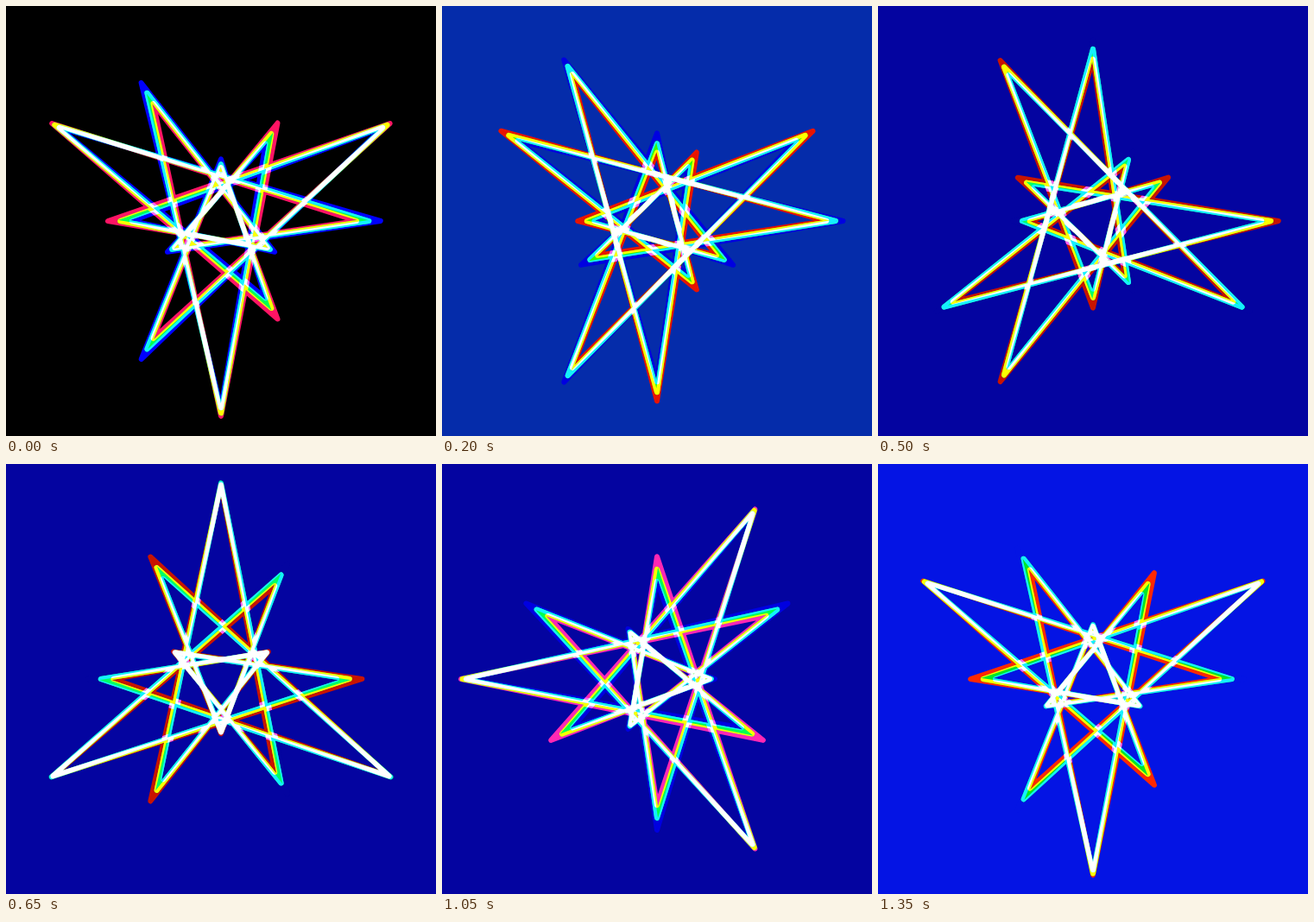
An HTML page with a canvas for the animation above (1.4 s loop, 498 by 498 pixels).

```html
<!DOCTYPE html>
<html lang="en">
<head>
<meta charset="utf-8">
<title>Pulsing star</title>
<style>
html, body { margin: 0; width: 100%; height: 100%; overflow: hidden; background: #000; }
canvas { display: block; width: 498px; height: 498px; }
</style>
</head>
<body>
<canvas id="stage" width="498" height="498"></canvas>
<script>
const SIZE = 498, MID = SIZE / 2, STEP_MS = 50, STEPS = 28;
const MEAN = 144, SWING = 83, LINE = 6;
const RAD = Math.PI / 180;

const ctx = document.getElementById('stage').getContext('2d');
const layer = document.createElement('canvas');
layer.width = layer.height = SIZE;
const mix = layer.getContext('2d');

// first step, background, red, green, blue
const moods = [
  [0, '#000000', '#ff1464', '#00ff50', '#0000ff'],
  [1, '#052caa', '#e81400', '#30ff00', '#0000e0'],
  [7, '#700c5a', '#f01e78', '#00ff14', '#0028e6'],
  [10, '#0404a0', '#c81400', '#00ff64', '#0404a0'],
  [15, '#0404a0', '#d21400', '#30ff00', '#0000e0'],
  [19, '#0404a0', '#ff28b4', '#00ff50', '#0000e0'],
  [24, '#0414e4', '#ff2800', '#00e628', '#0414e4']
];

// colours where the stars overlap
const overlaps = [
  [[0, 2], '#ff64ff'],
  [[0, 1], '#ffff00'],
  [[1, 2], '#14f0ff'],
  [[0, 1, 2], '#ffffff']
];

// Twelve corners joined five apart; radii swing a quarter turn out of step.
function starPath(phase) {
  const path = new Path2D();
  for (let i = 0; i < 12; i++) {
    const k = i * 5 % 12;
    const r = MEAN + SWING * Math.sin((phase - 90 * k) * RAD);
    path.lineTo(MID + r * Math.cos(30 * k * RAD), MID + r * Math.sin(30 * k * RAD));
  }
  path.closePath();
  return path;
}

function stroke(c, path, color, mode = 'source-over') {
  c.globalCompositeOperation = mode;
  c.lineWidth = LINE;
  c.lineJoin = 'round';
  c.strokeStyle = color;
  c.stroke(path);
}

// The pulse starts at half speed and takes a short step every seventh time.
const pulse = n => n <= 4 ? n : 2 * n - 4 - Math.floor(n / 7);

function draw(n) {
  const [, back, ...inks] = moods.filter(m => m[0] <= n).pop();
  const stars = [0, 1, 2].map(i => starPath(9 + 7.5 * pulse(n) + 10.2 * i));

  ctx.fillStyle = back;
  ctx.fillRect(0, 0, SIZE, SIZE);
  for (const i of [2, 0, 1]) stroke(ctx, stars[i], inks[i]);

  for (const [parts, color] of overlaps) {
    mix.globalCompositeOperation = 'source-over';
    mix.clearRect(0, 0, SIZE, SIZE);
    parts.forEach((p, j) => stroke(mix, stars[p], color, j ? 'source-in' : 'source-over'));
    ctx.drawImage(layer, 0, 0);
  }
}

const start = performance.now();
let shown = -1;
function tick(now) {
  const n = Math.floor(Math.max(0, now - start) / STEP_MS) % STEPS;
  if (n !== shown) draw(shown = n);
  requestAnimationFrame(tick);
}
tick(start);
</script>
</body>
</html>
```
